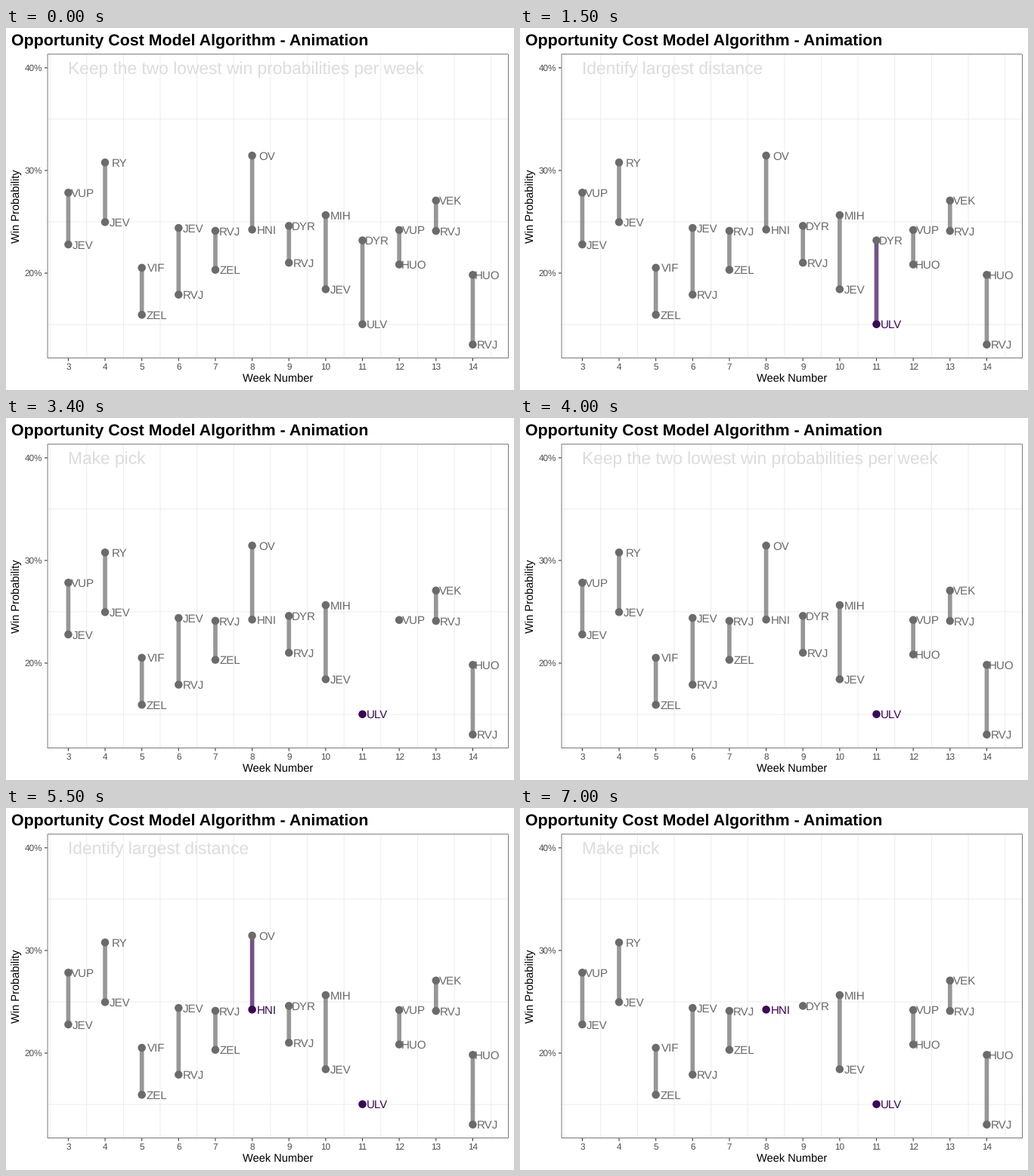
A matplotlib script that plays this animation: 672 by 480 pixels, repeating every 8 s.

```python
import matplotlib.pyplot as plt
from matplotlib.animation import FuncAnimation
from matplotlib.patches import Circle, Rectangle

W, H, DPI = 672, 480, 96
PX = 72 / DPI  # points per pixel
STEP_MS, STEPS = 500, 16

GREY, PURPLE = "#6b6b6b", "#3b0958"
LEFT, RIGHT, TOP, BOTTOM = 54.7, 664.67, 34.45, 437.9

# week: (high team, high %, low team, low %)
GAMES = {
    3: ("VUP", 27.84, "JEV", 22.79),
    4: ("RY", 30.78, "JEV", 24.97),
    5: ("VIF", 20.52, "ZEL", 15.94),
    6: ("JEV", 24.40, "RVJ", 17.90),
    7: ("RVJ", 24.12, "ZEL", 20.32),
    8: ("OV", 31.45, "HNI", 24.24),
    9: ("DYR", 24.60, "RVJ", 21.01),
    10: ("MIH", 25.65, "JEV", 18.43),
    11: ("DYR", 23.19, "ULV", 15.02),
    12: ("VUP", 24.20, "HUO", 20.84),
    13: ("VEK", 27.07, "RVJ", 24.11),
    14: ("HUO", 19.83, "RVJ", 13.04),
}

KEEP = "Keep the two lowest win probabilities per week"
FIND = "Identify largest distance"
PICK = "Make pick"

# (first step, caption, picked weeks, hidden (week, slot) pairs, dimmed)
STAGES = [
    (0, KEEP, (), (), False),
    (2, FIND, (11,), (), True),
    (3, FIND, (11,), (), False),
    (5, PICK, (11,), ((11, 0), (12, 1)), False),
    (8, KEEP, (11,), ((11, 0),), False),
    (11, FIND, (11, 8), ((11, 0),), False),
    (14, PICK, (11, 8), ((11, 0), (8, 0), (9, 1)), False),
]

plt.rcParams.update({
    "font.family": "Liberation Sans",
    "text.hinting": "none",
    "text.hinting_factor": 8,
    "path.snap": False,  # keep sub-pixel positions
})

fig = plt.figure(figsize=(W / DPI, H / DPI), dpi=DPI, facecolor="white")
ax = fig.add_axes([0, 0, 1, 1])
ax.set_xlim(0, W)
ax.set_ylim(H, 0)
ax.axis("off")


def week_x(week):
    return 82.4 + (week - 3) * 48.64


def prob_y(pct):
    return 325 - (pct - 20) * 13.61


def line(x, y, color, width, **kw):
    return ax.plot(x, y, color=color, lw=width * PX,
                   solid_capstyle="butt", **kw)[0]


def text(x, y, s, size, color="black", ha="left", **kw):
    return ax.text(x, y, s, fontsize=size, color=color, ha=ha,
                   va="baseline", **kw)


def draw_axes():
    for k in range(13):
        x = week_x(2.5 + k)
        line([x, x], [TOP, BOTTOM], "#ebebeb", 0.9, zorder=1)
    for pct in (15, 25, 35):
        y = prob_y(pct)
        line([LEFT, RIGHT], [y, y], "#ebebeb", 0.9, zorder=1)
    # only the inner half of the border stroke shows
    inset = 0.33
    ax.add_patch(Rectangle((LEFT + inset, TOP + inset),
                           RIGHT - LEFT - 2 * inset, BOTTOM - TOP - 2 * inset,
                           fill=False, ec="#333333", lw=2 * inset * PX,
                           zorder=6))
    for week in GAMES:
        x = week_x(week)
        line([x, x], [BOTTOM, BOTTOM + 3.67], "#333333", 1.07)
        text(x, 453.2, str(week), 8.8, "#4d4d4d", "center")
    for pct in (20, 30, 40):
        y = prob_y(pct)
        line([LEFT - 3.67, LEFT], [y, y], "#333333", 1.07)
        text(48.1, y + 4.2, f"{pct}%", 8.8, "#4d4d4d", "right")
    text(7.33, 23, "Opportunity Cost Model Algorithm - Animation", 16,
         weight="bold")
    text((LEFT + RIGHT) / 2, 470, "Week Number", 11, ha="center")
    text(18, (TOP + BOTTOM) / 2, "Win Probability", 11, ha="center",
         rotation=90, rotation_mode="anchor")


draw_axes()
caption = text(week_x(3), 61, "", 17.07, "#dcdcdc", zorder=2)
shade = ax.add_patch(Rectangle((0, 0), W, H, fc="black", ec="none",
                               alpha=0.66, zorder=10))

bars, dots, labels = {}, {}, {}
for week, (high, p_high, low, p_low) in GAMES.items():
    x = week_x(week)
    bars[week] = line([x, x], [prob_y(p_high), prob_y(p_low)], GREY, 5.67,
                      alpha=0.7, zorder=3)
    for slot, (team, pct) in enumerate(((high, p_high), (low, p_low))):
        y = prob_y(pct)
        dots[week, slot] = ax.add_patch(Circle((x, y), 5.25, fc=GREY, lw=0,
                                               zorder=4))
        labels[week, slot] = text(x + 19.46, y + 5.5, team, 11.38, GREY,
                                  "center", zorder=5)


def update(step):
    _, words, picked, hidden, dim = [s for s in STAGES if s[0] <= step][-1]
    caption.set_text(words)
    shade.set_visible(dim)
    accent = "#111111" if dim else PURPLE
    for week, bar in bars.items():
        bar.set_color(accent if week in picked else GREY)
        bar.set_visible(not any(w == week for w, _ in hidden))
    for key in dots:
        chosen = key[0] in picked and key[1] == 1
        for part in (dots[key], labels[key]):
            part.set_color(accent if chosen else GREY)
            part.set_visible(key not in hidden)
    return []


anim = FuncAnimation(fig, update, frames=STEPS, interval=STEP_MS,
                     repeat=True, repeat_delay=0, blit=False)
plt.show()
```
